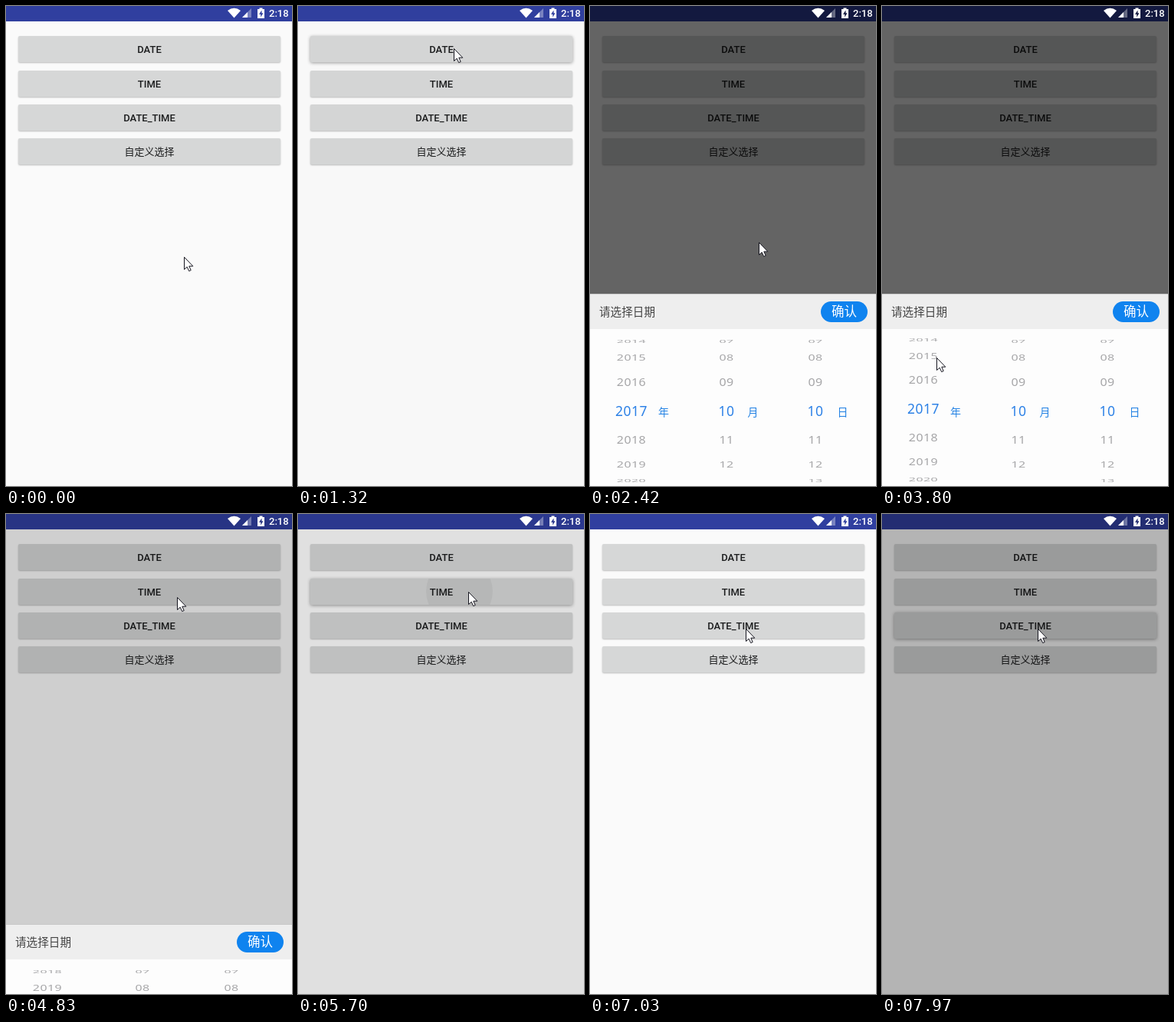
An HTML page that plays this animation: 373x624 px, repeating every 8000 ms.

```html
<!DOCTYPE html>
<html lang="zh-CN">
<head>
<meta charset="utf-8">
<title>Date picker</title>
<style>
html, body { margin: 0; width: 100%; height: 100%; overflow: hidden; }
body { position: relative; background: #fafafa; font-family: Roboto, "Noto Sans CJK SC", "Noto Sans CJK", sans-serif; }
#stage { position: absolute; left: 0; top: 0; width: 373px; height: 624px; overflow: hidden; background: #fafafa; }
#bar { position: absolute; left: 0; top: 0; width: 373px; height: 20px; background: #303f9f; }
.btn {
  position: absolute; left: 16px; width: 342px; height: 34px; border-radius: 2px;
  background: #d6d7d7; box-shadow: 0 1px 2px rgba(0,0,0,.25);
  font-size: 13px; font-weight: 500; line-height: 36px; text-align: center; color: #1c1d1e;
  overflow: hidden;
}
.btn.cjk { font-weight: 400; }
.btn.up { box-shadow: 0 1px 4px rgba(0,0,0,.38); }
.btn span { position: relative; }
.ripple { position: absolute; border-radius: 50%; background: #000; }
#dim { position: absolute; inset: 0; background: #000; }
#icons { position: absolute; left: 0; top: 0; }
#clock { position: absolute; left: 343px; top: 0; font-size: 13px; font-weight: 500; line-height: 19px; color: #fff; }
.sheet { position: absolute; left: 0; top: 374px; width: 373px; height: 250px; background: #fdfdfd; }
.head { position: absolute; left: 0; top: 0; width: 100%; height: 46px; background: #eee; box-shadow: inset 0 1px #c8c8c8; }
.title { position: absolute; left: 12px; line-height: 48px; color: #444; white-space: nowrap; }
.ok {
  position: absolute; left: 301px; top: 10px; width: 61px; height: 27px; border-radius: 14px;
  background: #0f83ef; color: #fff; font-size: 16.5px; line-height: 28px; text-align: center;
}
.row, .unit { position: absolute; width: 60px; height: 20px; line-height: 20px; text-align: center; }
.row { top: 141.5px; font-family: "Noto Sans", "Open Sans", sans-serif; letter-spacing: .45px; }
.unit { top: 144px; font-size: 14px; color: #2583e4; }
#cursor { position: absolute; left: 0; top: 0; overflow: visible; }
</style>
</head>
<body>
<div id="stage">
  <div id="bar"></div>
  <div id="dim"></div>
  <svg id="icons" width="340" height="20" fill="#fff">
    <path d="M289 6Q297.500 -.5 306 6L297.500 15.500Z"/>
    <path d="M308 15H320V3Z" opacity=".35"/>
    <path d="M308 15H315V8Z"/>
    <path fill-rule="evenodd" d="M330.500 2.500H334.500V4H337V16H328V4H330.500ZM333.500 5.500L330 10.700H332.200V14.500L335.500 9.200H333.500Z"/>
  </svg>
  <div id="clock">2:18</div>
  <svg id="cursor" width="13" height="20">
    <path d="M.5 .5V16.500L4.200 13.200L6.700 18.600L9.200 17.500L6.800 12.200H11.800Z" fill="#fff" stroke="#15151f"/>
  </svg>
</div>
<script>
const LOOP = 8000;
const $ = id => document.getElementById(id);
const stage = $('stage'), dim = $('dim'), cursor = $('cursor');

const clamp = v => Math.max(0, Math.min(1, v));
const smooth = p => (1 - Math.cos(Math.PI * p)) / 2;
const easeOut = p => 1 - (1 - p) ** 2;
const linear = p => p;

// Each key: [time, values, easing towards this key]
function track(keys, t) {
  let prev = keys[0];
  if (t <= prev[0]) return prev[1];
  for (const key of keys) {
    if (t < key[0]) {
      const p = (key[2] || smooth)((t - prev[0]) / (key[0] - prev[0]));
      return prev[1].map((v, i) => v + (key[1][i] - v) * p);
    }
    prev = key;
  }
  return prev[1];
}

const cursorKeys = [
  [0, [232, 326]], [310, [224, 32]],
  [470, [224, 32]], [710, [203, 52]],
  [1300, [203, 52]], [1640, [203, 337]], [2110, [227, 295]],
  [2300, [227, 295]], [3110, [97, 520]],
  [3720, [71, 461]], [3800, [71, 457], linear], [3970, [72, 414], linear],
  [4420, [223, 108]], [4830, [223, 108]], [5070, [222, 101]],
  [5700, [222, 101]], [6320, [188, 304]],
  [6570, [188, 304]], [7030, [203, 149]]
];
const yearKeys = [
  [3720, [0]], [3800, [.075], linear], [3970, [1.2], linear], [4450, [4], easeOut]
];

const presses = [
  { button: 0, down: 1020, up: 1760, tap: 1313, x: 200 },
  { button: 1, down: 5290, up: 6050, tap: 5620, x: 216 },
  { button: 2, down: 7250, up: LOOP, tap: LOOP, x: 204 }
];
const dialogs = [
  { sheet: 0, open: 1313, show: 1313, close: 4455 },
  { sheet: 1, open: 5608, show: 5690, close: 6480 },
  { sheet: 1, open: 7723, show: 7880, close: LOOP * 2 }
];
const DIM_MS = 530, RISE_DELAY = 250, RISE_MS = 250, FALL_MS = 640, GONE_MS = 550;

function add(parent, cls, text) {
  const el = document.createElement('div');
  el.className = cls;
  if (text) el.textContent = text;
  parent.append(el);
  return el;
}

const buttons = ['DATE', 'TIME', 'DATE_TIME', '自定义选择'].map((label, i) => {
  const el = add(stage, i === 3 ? 'btn cjk' : 'btn');
  el.style.top = 39.4 + 44.1 * i + 'px';
  const ripple = add(el, 'ripple');
  const text = document.createElement('span');
  text.textContent = label;
  el.append(text);
  dim.before(el);
  return { el, ripple };
});

// A wheel is a drum seen from the front: 22.5 degrees per row
const RADIUS = 98, STEP = Math.PI / 8;

function makeWheel(sheet, { x, unit, unitX, value, max }) {
  add(sheet, 'unit', unit).style.left = unitX - 30 + 'px';
  const rows = Array.from({ length: 9 }, () => {
    const el = add(sheet, 'row');
    el.style.left = x - 30 + 'px';
    return el;
  });
  return pos => {
    const mid = Math.round(pos);
    rows.forEach((el, i) => {
      const n = mid + i - 4, angle = (n - pos) * STEP, num = value + n;
      const shown = Math.abs(angle) < 1.4 && num <= max;
      el.style.display = shown ? '' : 'none';
      if (!shown) return;
      el.textContent = String(num).padStart(2, '0');
      el.style.fontSize = n === mid ? '17.5px' : '16px';
      el.style.color = n === mid ? '#2b80e6' : '#a6a6a8';
      el.style.transform = `translateY(${RADIUS * Math.sin(angle)}px) scaleY(${Math.cos(angle)})`;
    });
  };
}

function makeSheet(title, size, columns) {
  const el = add(stage, 'sheet');
  const head = add(el, 'head');
  add(head, 'title', title).style.fontSize = size + 'px';
  add(head, 'ok', '确认');
  const wheels = columns.map(c => makeWheel(el, c));
  wheels.forEach(turn => turn(0));
  cursor.before(el);
  return { el, wheels };
}

const sheets = [
  makeSheet('请选择日期', 14.6, [
    { x: 54, unit: '年', unitX: 96, value: 2017, max: 2100 },
    { x: 178, unit: '月', unitX: 212.5, value: 10, max: 12 },
    { x: 294, unit: '日', unitX: 329.5, value: 10, max: 31 }
  ]),
  makeSheet('请选择时间', 13.9, [
    { x: 120, unit: '时', unitX: 150.5, value: 17, max: 23 },
    { x: 279, unit: '分', unitX: 310, value: 30, max: 59 }
  ])
];

function drawDialogs(t) {
  const slide = [0, 0];
  let shade = 0;
  for (const d of dialogs) {
    if (t < d.show) continue;
    if (t < d.close) {
      shade = clamp((t - d.open) / DIM_MS);
      slide[d.sheet] = smooth(clamp((t - d.open - RISE_DELAY) / RISE_MS));
    } else {
      const age = t - d.close;
      shade = clamp(1 - age / DIM_MS);
      slide[d.sheet] = age < GONE_MS ? 1 - smooth(clamp(age / FALL_MS)) : 0;
    }
  }
  dim.style.opacity = shade * .6;
  sheets.forEach(({ el }, i) => {
    el.style.visibility = slide[i] > 0 ? 'visible' : 'hidden';
    el.style.transform = `translateY(${Math.round(250 * (1 - slide[i]))}px)`;
  });
}

function drawPresses(t) {
  for (const p of presses) {
    const { el, ripple } = buttons[p.button];
    el.classList.toggle('up', t >= p.down && t < p.up);
    const age = (t - p.tap) / 440;
    const on = t >= p.tap + 60 && age < 1;
    ripple.style.display = on ? '' : 'none';
    if (!on) continue;
    const r = 15 + 155 * age, x = p.x - 16 + (187 - p.x) * age;
    Object.assign(ripple.style, {
      left: x - r + 'px', top: 17 - r + 'px',
      width: 2 * r + 'px', height: 2 * r + 'px',
      opacity: .06 * (1 - age)
    });
  }
}

function draw(t) {
  const [x, y] = track(cursorKeys, t);
  cursor.style.transform = `translate(${Math.round(x)}px, ${Math.round(y)}px)`;
  sheets[0].wheels[0](track(yearKeys, t)[0]);
  drawDialogs(t);
  drawPresses(t);
}

const start = performance.now();
function tick() {
  draw((performance.now() - start) % LOOP);
  requestAnimationFrame(tick);
}
tick();
</script>
</body>
</html>
```
